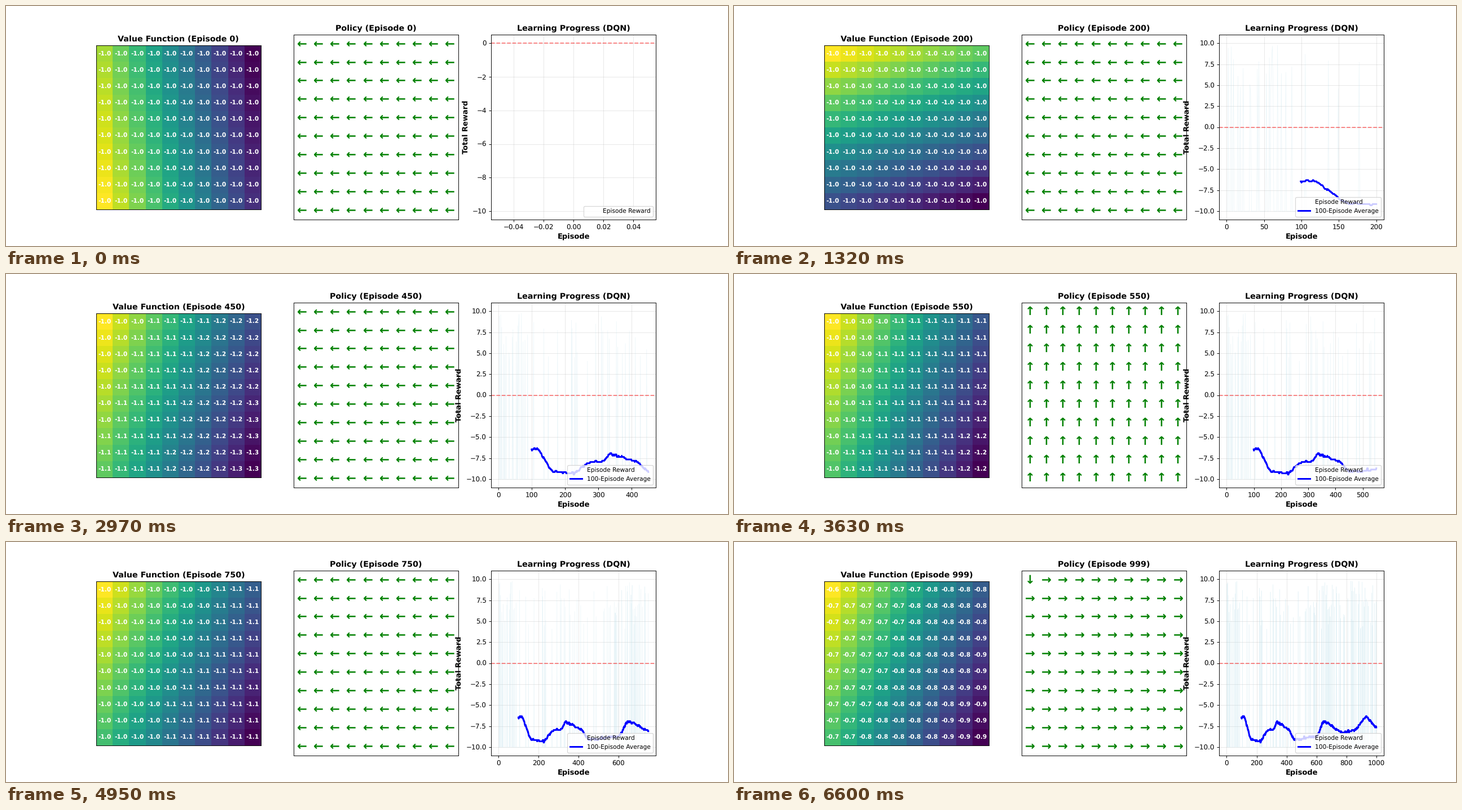
Write a matplotlib script that moves like this. It is 1280x427 px and loops after 6.93 s.

```python
import numpy as np
import matplotlib.pyplot as plt
from matplotlib.animation import FuncAnimation

plt.rcParams["text.hinting"] = "none"

N = 10
STEPS = 21
INTERVAL = 330
TOTAL = 1000
BOLD = {"fontweight": "bold"}

# Key states: step, main arrow, top-left value, change to the right, change down
STATES = [
    (0, "←", -1.004, -0.026, 0.004),
    (2, "↓", -1.0555, 0.0205, 0.112),
    (4, "←", -0.970, -0.015, -0.045),
    (7, "←", -0.997, -0.305, -0.092),
    (11, "↑", -0.998, -0.131, -0.049),
    (15, "←", -0.985, -0.085, -0.036),
    (20, "→", -0.647, -0.179, -0.074),
]
KEY_STEPS, ARROWS, *PLANES = zip(*STATES)

# Turning points of the moving average
TURNS = [(99, -6.4), (114, -6.3), (165, -9.1), (225, -9.3), (275, -8.0),
         (310, -7.9), (337, -7.0), (415, -7.9), (450, -9.1), (600, -8.7),
         (648, -6.9), (770, -8.2), (850, -8.0), (932, -6.4), (999, -7.7)]

rng = np.random.default_rng(7)
episodes = np.arange(TOTAL)
rows, cols = np.mgrid[:N, :N]


def eased(x, points):
    """Pass through the points with a soft turn at each of them."""
    px, py = np.array(points).T
    i = np.clip(np.searchsorted(px, x, side="right") - 1, 0, len(px) - 2)
    t = np.clip((x - px[i]) / (px[i + 1] - px[i]), 0, 1)
    t = 0.5 * t + 0.25 * (1 - np.cos(np.pi * t))
    return py[i] + (py[i + 1] - py[i]) * t


# Each win entering or leaving the window makes the average jump
jitter = np.repeat(rng.normal(0, 0.07, TOTAL // 5), 5)
average = np.round((eased(episodes, TURNS) + jitter) / 0.15) * 0.15

# Mostly failures, with wins as frequent as the average asks for
wins = rng.random(TOTAL) < (eased(episodes + 50, TURNS) + 10) / 17
wins[0] = False
rewards = np.where(wins, rng.uniform(4, 9.8, TOTAL), -10)


def value_grid(step):
    start, right, down = (np.interp(step, KEY_STEPS, p) for p in PLANES)
    return start + (right * cols + down * rows) / (N - 1)


def policy_grid(step):
    key = int(np.argmin(np.abs(np.array(KEY_STEPS) - step)))
    grid = np.full((N, N), ARROWS[key])
    if ARROWS[key] == "↓":
        # Close to the goal the path bends towards it
        grid[cols - 6 * (N - 1 - rows) >= 2] = "→"
        grid[-1, -1] = "↑"
    elif ARROWS[key] == "→":
        grid[0, 0] = "↓"
    return grid


def cell_texts(ax, **style):
    return [ax.text(c, r, "", ha="center", va="center", **BOLD, **style)
            for r in range(N) for c in range(N)]


def fill(texts, labels):
    for text, label in zip(texts, labels):
        text.set_text(label)


def title(ax, text):
    ax.set_title(text, fontsize=12, **BOLD)


fig, (ax_value, ax_policy, ax_reward) = plt.subplots(
    1, 3, figsize=(15, 1281 / 256), dpi=256 / 3)

image = ax_value.imshow(value_grid(0), cmap="viridis")
value_texts = cell_texts(ax_value, color="white", fontsize=9)

ax_policy.set(xlim=(-0.5, N - 0.5), ylim=(N - 0.5, -0.5))
policy_texts = cell_texts(ax_policy, color="green", fontsize=18)

for ax in (ax_value, ax_policy):
    ax.set(xticks=[], yticks=[])


def draw_rewards(last):
    ax = ax_reward
    ax.clear()
    n = last + 1
    ax.plot(episodes[:n], rewards[:n], color="lightblue", alpha=0.3, lw=0.5,
            label="Episode Reward")
    if n >= 100:
        ax.plot(episodes[99:n], average[99:n], color="blue", lw=2.5,
                label="100-Episode Average")
    ax.axhline(0, color="red", ls="--", alpha=0.5)
    if last:
        ax.set_ylim(-11, 11)
    ax.set_xlabel("Episode", fontsize=11, **BOLD)
    ax.set_ylabel("Total Reward", fontsize=11, **BOLD)
    title(ax, "Learning Progress (DQN)")
    ax.grid(True, alpha=0.3)
    legend = ax.legend(loc="lower right", fontsize=9)
    legend.get_lines()[0].set_alpha(0)


def update(step):
    episode = min(50 * step, TOTAL - 1)
    values = value_grid(step)
    image.set_data(values)
    image.set_clim(values.min(), values.max())
    fill(value_texts, [f"{v:.1f}" for v in values.flat])
    fill(policy_texts, policy_grid(step).flat)
    title(ax_value, f"Value Function (Episode {episode})")
    title(ax_policy, f"Policy (Episode {episode})")
    draw_rewards(episode)
    return []


anim = FuncAnimation(fig, update, frames=STEPS, interval=INTERVAL,
                     init_func=lambda: [], repeat=True, repeat_delay=0,
                     blit=False)
plt.show()
```
